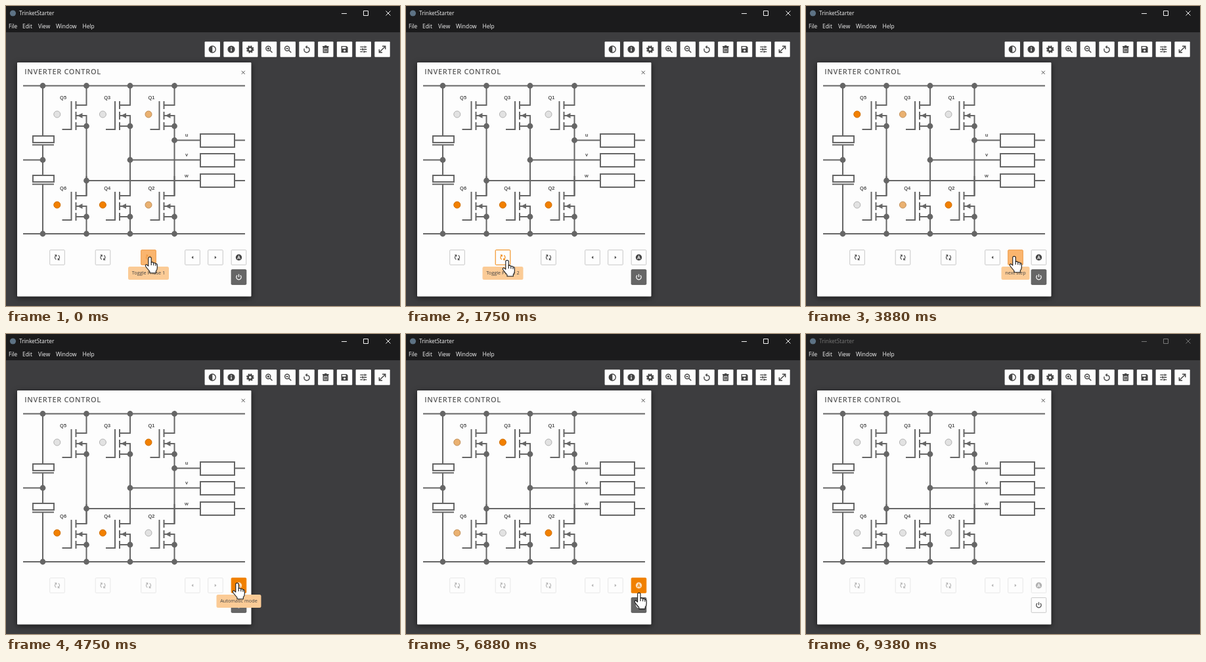
Animation of 600 by 457 pixels, one loop 9.51 s. Source, as an HTML page:

```html
<!DOCTYPE html>
<html lang="en">
<head>
<meta charset="utf-8">
<title>Inverter control</title>
<style>
  html, body { margin: 0; height: 100%; overflow: hidden; background: #3d3d3f; }
  svg { display: block; width: 100vw; height: 100vh; font-family: "Open Sans", "Noto Sans", sans-serif; }
  .panel { filter: drop-shadow(0 2px 4px #0009); }
  .wire { fill: none; stroke: #666; stroke-width: 2; }
  .box { fill: #fdfdfd; stroke: #666; stroke-width: 2; }
  .label { font: bold 7.5px "Liberation Sans", Arial, sans-serif; fill: #555; text-anchor: middle; }
  .icon { fill: none; stroke: currentColor; stroke-width: 1.4; }
  .icon .solid { fill: currentColor; stroke: none; }
  .icon .hole { fill: var(--hole, #fdfdfd); stroke: none; }
  .menu { font-size: 8.4px; }
  .tip { font-size: 7.3px; fill: #444; text-anchor: middle; }
</style>
</head>
<body>
<svg id="stage" viewBox="0 0 600 457"></svg>
<script>
const LOOP = 9510, STEP = 125, FADE = 250;
const GREY = '#666', ORANGE = '#f08000', PAPER = '#fdfdfd';
const stage = document.getElementById('stage');

const wire = d => `<path class="wire" d="${d}"/>`;
const dot = (x, y) => `<circle cx="${x}" cy="${y}" r="4.4" fill="${GREY}"/>`;
const box = (x, y, w, h) => `<rect class="box" x="${x}" y="${y}" width="${w}" height="${h}"/>`;
const label = (x, y, s) => `<text class="label" x="${x}" y="${y}">${s}</text>`;
const at = (x, y, s, color) => `<g class="icon" transform="translate(${x} ${y})" color="${color}">${s}</g>`;

// Icons are centred on 0,0
const lens = '<circle cx="-1.2" cy="-1.2" r="3.5"/><path d="M1.4 1.4L5 5M-3-1.2H.6"/>';
const tools = [
  '<circle r="5"/><path class="solid" d="M0-5a5 5 0 0 0 0 10z"/>',
  '<circle class="solid" r="5.6"/><path stroke="#fdfdfd" d="M0-.8V3M0-3.2v1.4"/>',
  '<circle r="3.2" stroke-width="2.6"/><circle r="4.8" stroke-width="2" stroke-dasharray="2.1 1.67"/>',
  lens + '<path d="M-1.2-3V.6"/>',
  lens,
  '<path d="M0-3.4a4.1 4.1 0 1 1-3.7 2.3"/><path class="solid" d="M.6-6.2v5.4l-3-2.7z"/>',
  '<path stroke-width="1.6" d="M-3.4-2.6h6.8v7.4h-6.8zM-4.8-4.3h9.6M-1.6-5.3h3.2M-1.1-1v4.5M1.1-1v4.5"/>',
  '<path class="solid" d="M-5-5h8l2 2v8h-10z"/><path class="hole" d="M-3.6-3.7h5.6v2.5h-5.6z"/><circle class="hole" cy="2" r="1.6"/>',
  '<path d="M-5-3.6h6M3-3.6h2M2.2-5.3v3.4M-5 0h2.2M-.8 0H5M-1.5-1.7v3.4M-5 3.6h4M1 3.6h4M.9 1.9v3.4"/>',
  '<path d="M-4.3 4.3l8.6-8.6M0-4.7h4.7V0M0 4.7h-4.7V0"/>'
];
const sync = '<path stroke-width="1.1" d="M-1.6 3.3a3.6 3.6 0 0 1 0-6.4M1.6-3.3a3.6 3.6 0 0 1 0 6.4M-3.8-3.7h2.5v2.5M3.8 3.7H1.3V1.2"/>';
const arrow = dir => `<path class="solid" transform="scale(${dir} 1)" d="M-1.2-2.2v4.4L1.5 0z"/>`;
const auto = '<circle class="solid" r="4.7"/><path style="stroke:var(--hole)" stroke-width="1" d="M-2 2.6L0-2.5 2 2.6M-1.3 1h2.6"/>';
const power = '<path stroke-width="1.2" d="M-2.3-2.8a3.7 3.7 0 1 0 4.6 0M0-4.5V0"/>';

const P1 = 2, P2 = 1, NEXT = 4, AUTO = 5, POWER = 6;
const buttons = [
  [78, 383, sync], [147.5, 383, sync], [217, 383, sync], [284, 383, arrow(-1)],
  [319, 383, arrow(1)], [354.5, 383, auto], [354.5, 413, power]
];
const tips = {
  [P1]: ['Toggle Phase 1', 62], [P2]: ['Toggle Phase 2', 62],
  [NEXT]: ['next step', 43], [AUTO]: ['Automatic mode', 68]
};

// Clicks: time, button, upper switches of phases 1-3 ("-" is powerless)
const clicks = [
  [-125, P1, '100'], [750, P1, '000'], [1125, P2, '010'], [1500, P2, '000'],
  [2375, NEXT, '100'], [2625, NEXT, '110'], [3125, NEXT, '010'], [3500, NEXT, '011'],
  [3750, NEXT, '001'], [4125, NEXT, '101'], [4375, NEXT, '100'],
  [4750, AUTO, '110'], [7250, POWER, '---']
];
const AUTO_ON = 4750, POWER_OFF = 7250, BLUR = 8500;
const cycle = ['110', '010', '011', '001', '101', '100'];
const changes = clicks.map(([t, , s]) => [t, s]);
for (let i = 1; AUTO_ON + i * 250 < POWER_OFF; i++) changes.push([AUTO_ON + i * 250, cycle[i % 6]]);
changes.sort((a, b) => a[0] - b[0]);

// Cursor stays: arrival, departure, x, y, button
const stays = [
  [0, 875, 219, 382, P1], [1100, 1875, 154, 387, P2], [2250, 4450, 317, 381, NEXT],
  [4700, 6700, 352, 379, AUTO], [7100, BLUR, 359, 416, POWER]
];

function cursorAt(t) {
  const i = stays.findLastIndex(s => t >= s[0]);
  const [, leave, x, y, button] = stays[i], next = stays[i + 1];
  if (t <= leave || !next) return { x, y, button };
  const p = (t - leave) / (next[0] - leave), e = p * p * (3 - 2 * p);
  return { x: x + (next[2] - x) * e, y: y + (next[3] - y) * e, button: -1 };
}

function transistor(x, dy) {
  return `<g transform="translate(${x} ${dy})">` +
    wire('M0 121V151H-16M-16 145V157M-16 161V173M-16 177V189M-37 188H-23V145M-16 167H0V183H-16') +
    `<path fill="${GREY}" d="M-14 167l8-4v8z"/>` + dot(0, 183) + '</g>';
}

function scenery() {
  let s = '<rect width="600" height="457" fill="#3d3d3f"/>';
  tools.forEach((icon, i) => {
    const x = 314.3 + i * 28.75;
    s += `<rect x="${x - 11.7}" y="54.3" width="23.4" height="23.4" rx="1" fill="${PAPER}"/>` + at(x, 66, icon, '#444');
  });
  s += `<rect class="panel" x="17" y="86" width="356.5" height="356.5" rx="1" fill="${PAPER}"/>
    <text x="28.3" y="104" font-size="11" font-weight="600" letter-spacing=".65" fill="#5c5c5c">INVERTER CONTROL</text>` +
    at(361.3, 101.3, '<path stroke-width="1" d="M-2.5-2.5l5 5M2.5-2.5l-5 5"/>', '#555');
  s += wire('M26 121.5H364M26 347H364M26 234.5H56M56 121V198M56 211V258M56 271V347M40 211.5H73M40 271.5H73');
  s += box(41, 198, 32, 10) + box(41, 258, 32, 10) + dot(56, 121.5) + dot(56, 234.5) + dot(56, 347);
  [[256.5, 204.5, 'u', 195], [189, 234.5, 'v', 225], [122.5, 266, 'w', 256]].forEach(([x, y, name, top], i) => {
    s += transistor(x, 0) + transistor(x, 138) + wire(`M${x} 183V289M${x} 321V347M${x} ${y}H364`);
    s += box(296, top, 52, 20) + dot(x, y) + dot(x, 121.5) + dot(x, 347);
    const qx = 221.5 - i * 67.2;
    s += label(qx, 142, 'Q' + (2 * i + 1)) + label(qx, 280, 'Q' + (2 * i + 2)) + label(275, y - 5.5, name);
  });
  return s;
}

function windowBar(active) {
  const ink = active ? '#f4f4f4' : '#777';
  let s = `<rect width="600" height="40" fill="${active ? '#1b1b1c' : '#202021'}"/>
    <circle cx="10.5" cy="11" r="4.6" fill="#5d7284"/>
    <text class="menu" x="20" y="14" fill="${ink}">TrinketStarter</text>` +
    at(0, 0, '<path stroke-width="1" d="M511 11.5h8M544.5 7.5h7v7h-7zM578.5 7.5l7 7M585.5 7.5l-7 7"/>', ink);
  [['File', 4], ['Edit', 25], ['View', 49], ['Window', 76], ['Help', 116.5]].forEach(([word, x]) => {
    s += `<text class="menu" x="${x}" y="34" fill="#f4f4f4">${word}</text>`;
  });
  return s;
}

function led(x, y, v) {
  const mix = (a, b) => a.map((c, i) => Math.round(c + (b[i] - c) * v));
  return `<circle cx="${x}" cy="${y}" r="5" fill="rgb(${mix([226, 226, 226], [242, 128, 0])})"
    stroke="rgb(${mix([178, 178, 178], [205, 108, 0])})"/>`;
}

function leds(t) {
  const i = changes.findLastIndex(c => t >= c[0]);
  const [start, now] = changes[i], before = i ? changes[i - 1][1] : '000';
  const p = Math.min(1, (t - start) / FADE);
  let s = '';
  for (let k = 0; k < 3; k++) {
    const level = on => (before[k] === on) * (1 - p) + (now[k] === on) * p;
    const x = 217 - k * 69.6;
    s += led(x, 165, level('1')) + led(x, 303, level('0'));
  }
  return s;
}

function button(i, t, hover) {
  const [x, y, icon] = buttons[i];
  const off = t >= POWER_OFF, automatic = t >= AUTO_ON && !off;
  const pressed = clicks.some(c => c[1] === i && t >= c[0] && t < c[0] + 200);
  const disabled = i !== POWER && (off || automatic && i !== AUTO);
  let fill = PAPER, edge = '#c8c8c8', ink = '#444';
  if (hover && !disabled) edge = ink = ORANGE;
  if (i === POWER && !off) { fill = GREY; ink = hover ? ORANGE : PAPER; if (!hover) edge = '#555'; }
  if (i === AUTO && automatic) { fill = edge = ORANGE; ink = '#fbe0c0'; }
  else if (pressed) { fill = '#fab56e'; edge = ink = '#ee9a45'; }
  return `<g opacity="${disabled ? .4 : 1}" style="--hole:${fill}">
    <rect x="${x - 11.3}" y="${y - 11.3}" width="22.6" height="22.6" rx="1" fill="${fill}" stroke="${edge}"/>` +
    at(x, y, icon, ink) + '</g>';
}

function tooltip(i) {
  if (!tips[i]) return '';
  const [text, w] = tips[i], x = buttons[i][0];
  return `<rect x="${x - w / 2}" y="397" width="${w}" height="20" rx="2.5" fill="#fbcb96"/>
    <text class="tip" x="${x}" y="409">${text}</text>`;
}

const hand = (x, y) => `<g transform="translate(${x} ${y})" stroke="#151515" stroke-width="1.1" stroke-linejoin="round">
  <path fill="#fff" d="M-2.2 2.4a2.2 2.2 0 0 1 4.4 0V8.5q2.6-1 3.6 1 2.6-.8 3.2 1 2.3-.2 2.3 2V17q0 3-2 5v2.8H0V22.5L-5.8 15.5q-2-3.4.8-3.7l2.8 2.4z"/>
  <path fill="none" d="M2.2 8.5V13M5.8 9.5V13.3M9 10.5V13.8"/></g>`;

stage.innerHTML = scenery() + '<g id="live"></g>';
const live = document.getElementById('live');
let shown = -1;

function draw(now) {
  const t = Math.floor(now % LOOP / STEP) * STEP;
  if (t !== shown) {
    shown = t;
    const active = t < BLUR, cursor = cursorAt(t), over = active ? cursor.button : -1;
    live.innerHTML = windowBar(active) + leds(t) +
      buttons.map((_, i) => button(i, t, i === over)).join('') +
      tooltip(over) + (active ? hand(cursor.x, cursor.y) : '');
  }
  requestAnimationFrame(draw);
}
draw(performance.now());
</script>
</body>
</html>
```
